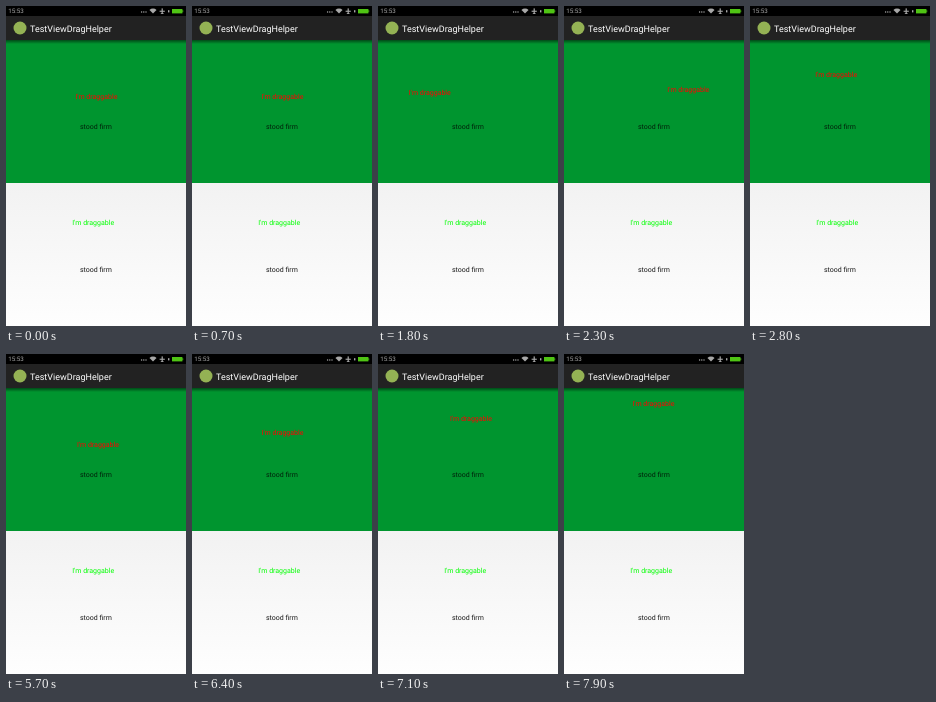
An HTML page with a canvas for the animation above (8 s loop, 180 by 320 pixels).

```html
<!DOCTYPE html>
<html lang="en">
<head>
<meta charset="utf-8">
<title>Drag demo</title>
<style>
  html, body { margin: 0; width: 100%; height: 100%; overflow: hidden; background: #000; }
  canvas { display: block; width: 180px; height: 320px; }
</style>
</head>
<body>
<canvas id="stage"></canvas>
<script>
const W = 180, H = 320, LOOP = 8000, STEP = 100;
const BAR = 10, TOP = 34, PANEL = (H - TOP) / 2;
const REST_X = 69.4, REST_Y = 93;

const canvas = document.getElementById('stage');
const scale = window.devicePixelRatio || 1;
canvas.width = W * scale;
canvas.height = H * scale;
const ctx = canvas.getContext('2d');
ctx.scale(scale, scale);

// Turning points of the drags: [time, position]
const X_TURNS = [
  [1400, REST_X], [2000, 18], [2400, 118], [3050, 40], [3200, 40], [3500, REST_X],
  [5600, REST_X], [6000, 80], [6500, 68.4], [6850, 77], [7300, 68.4], [7600, 78], [7900, 68.4]
];
const Y_TURNS = [
  [1400, REST_Y], [1600, 102], [2050, 71.5], [2300, 86], [2800, 71.3], [3200, 80.5], [3500, REST_Y],
  [5700, REST_Y], [6150, 61], [6700, 108], [7100, 67], [7500, 101], [7900, 52]
];

// Sine easing from one turning point to the next
function swing(turns, t) {
  const i = turns.findIndex(([time]) => time > t);
  if (i === 0) return turns[0][1];
  if (i < 0) return turns[turns.length - 1][1];
  const [t0, from] = turns[i - 1], [t1, to] = turns[i];
  const ease = (1 - Math.cos(Math.PI * (t - t0) / (t1 - t0))) / 2;
  return from + (to - from) * ease;
}

function box(x, y, w, h, fill) {
  ctx.fillStyle = fill;
  ctx.fillRect(x, y, w, h);
}

function text(str, x, y, size, color) {
  ctx.font = size + 'px Roboto, sans-serif';
  ctx.textRendering = 'geometricPrecision';
  ctx.fillStyle = color;
  ctx.fillText(str, x, y);
}

function disc(x, y, r, color) {
  ctx.fillStyle = color;
  ctx.beginPath();
  ctx.arc(x, y, r, 0, Math.PI * 2);
  ctx.fill();
}

function fade(y, h, from, to) {
  const shade = ctx.createLinearGradient(0, y, 0, y + h);
  shade.addColorStop(0, from);
  shade.addColorStop(1, to);
  box(0, y, W, h, shade);
}

function wifi(x, y, color) {
  ctx.fillStyle = color;
  ctx.beginPath();
  ctx.moveTo(x, y);
  ctx.arc(x, y, 5, -Math.PI * 0.75, -Math.PI * 0.25);
  ctx.fill();
}

function plane(x, y, color) {
  box(x - 0.6, y - 2.8, 1.2, 5.6, color);
  box(x - 2.6, y - 0.5, 5.2, 1.1, color);
  box(x - 1.4, y + 2, 2.8, 0.8, color);
}

function statusBar() {
  const ink = '#a8a8a8';
  box(0, 0, W, BAR, '#000');
  text('15:53', 2.3, 7.3, 6.2, ink);
  for (let i = 0; i < 3; i++) disc(135.6 + i * 2.2, 6, 0.7, ink);
  wifi(147, 7.6, ink);
  plane(156.2, 5.2, ink);
  box(162, 4.2, 1.4, 2.2, ink);
  box(166, 3, 10.4, 4.4, '#4fc414');
  box(176.4, 4.2, 0.8, 2, '#4fc414');
}

function titleBar() {
  box(0, BAR, W, TOP - BAR, '#222');
  disc(14, 22, 6.5, '#94b254');
  text('TestViewDragHelper', 24, 25.5, 9, '#fff');
}

function panels() {
  const middle = TOP + PANEL;
  box(0, TOP, W, PANEL, '#00952f');
  fade(TOP, 4, 'rgba(0,0,0,.5)', 'rgba(0,0,0,0)');
  fade(middle, PANEL, '#f2f2f2', '#fefefe');
  text('stood firm', 73.9, 123, 7, 'rgba(0,0,0,.78)');
  text("I'm draggable", 66.2, 219, 7, '#0f0');
  text('stood firm', 73.9, middle + 89, 7, '#1a1a1a');
}

const start = performance.now();
function draw() {
  const now = (performance.now() - start) % LOOP;
  const t = Math.floor(now / STEP) * STEP;
  statusBar();
  titleBar();
  panels();
  text("I'm draggable", swing(X_TURNS, t), swing(Y_TURNS, t), 7, '#f00');
  requestAnimationFrame(draw);
}
draw();
</script>
</body>
</html>
```
